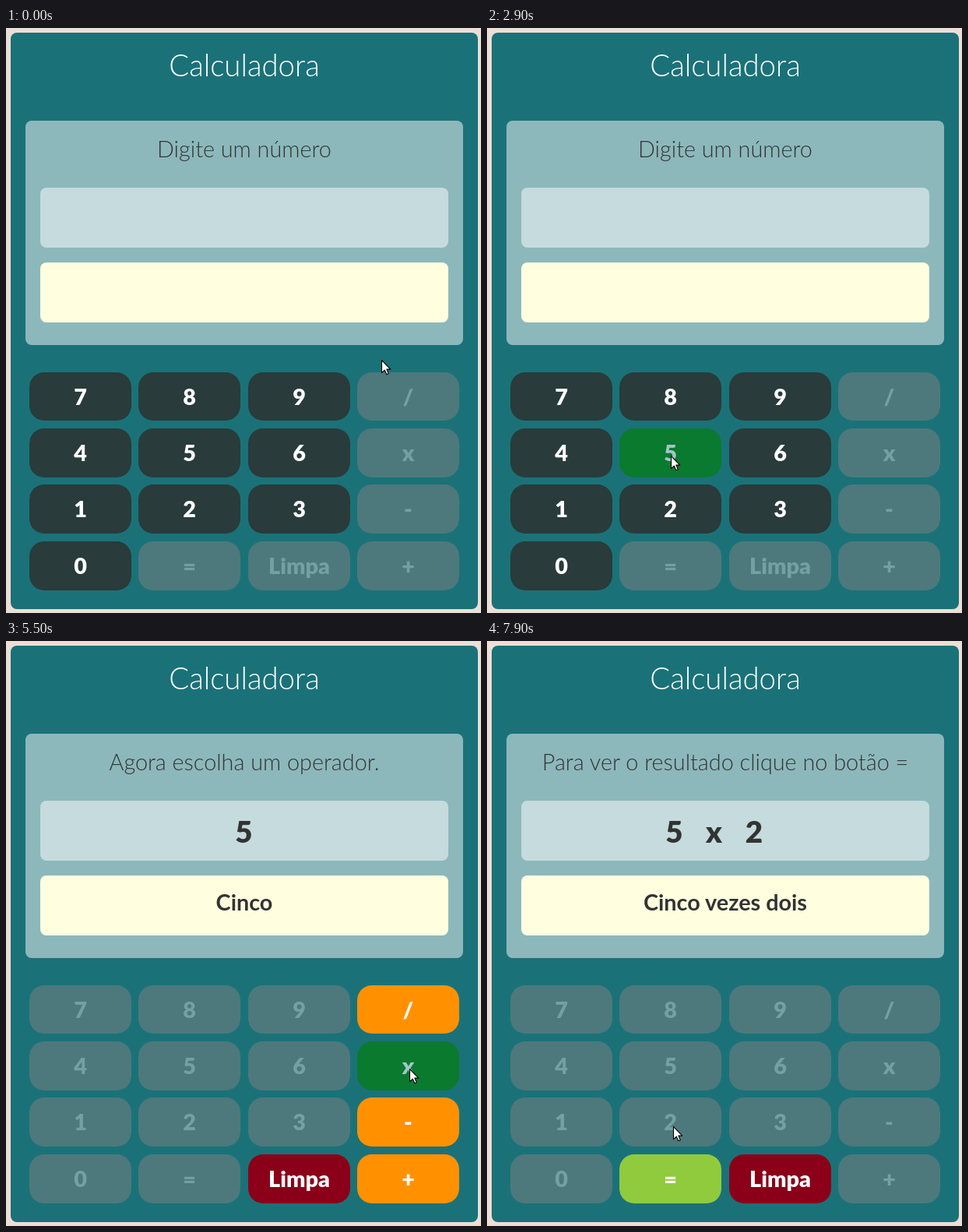
These frames come from a looping animation (610x751 px, 8000 ms). An HTML page:

```html
<!DOCTYPE html>
<html lang="pt">
<head>
<meta charset="utf-8">
<title>Calculadora</title>
<style>
  html, body { margin: 0; width: 100%; height: 100%; overflow: hidden; background: #ecdfd6; }
  svg { display: block; width: 610px; height: 751px; }
  text { font-family: Lato, sans-serif; font-size: 28.8px; text-anchor: middle; fill: #333; }
  .title { font-size: 38.4px; font-weight: 300; fill: #fff; }
  .message { font-weight: 300; }
  .term { font-size: 38.4px; font-weight: 900; }
  .words { font-weight: 700; }
  .key text { font-weight: 900; fill: #fff; }
  .digit rect { fill: #293b3a; }
  .op rect { fill: #ff9100; }
  .equal rect { fill: #90cb3e; }
  .clear rect { fill: #8b0018; }
  .off rect { fill: #4d797c; }
  .off text { fill: #74a0a3; }
  .hover { opacity: .6; }
  .press rect { fill: #008000; }
</style>
</head>
<body>
<svg id="stage" viewBox="0 0 610 751">
  <rect x="6" y="6" width="600" height="740" rx="8" fill="#1a7278"/>
  <text class="title" x="306" y="62">Calculadora</text>
  <rect x="25" y="119" width="562" height="288" rx="8" fill="#8cb8bb"/>
  <text class="message" id="message" x="306" y="166"></text>
  <rect x="44" y="205" width="524" height="77" rx="8" fill="#c5dbdd"/>
  <g id="terms"></g>
  <rect x="44" y="301" width="524" height="77" rx="8" fill="#ffffe0"/>
  <text class="words" id="words" x="306" y="346"></text>
  <g id="keys"></g>
  <path id="cursor" d="M.5 .5V16.6L4.3 13.1L6.8 18.8L9.3 17.7L6.9 12.1H11.8Z"
        fill="#fff" stroke="#000" stroke-width="1.1" stroke-linejoin="round"/>
</svg>
<script>
const LOOP = 8000;
const $ = id => document.getElementById(id);

function add(parent, tag, attrs, text = '') {
  const el = document.createElementNS('http://www.w3.org/2000/svg', tag);
  for (const k in attrs) el.setAttribute(k, attrs[k]);
  el.textContent = text;
  return parent.appendChild(el);
}

// Keypad
const colX = [30, 170, 311, 451];
const rowY = [442, 514, 586, 659];
const rows = ['7 8 9 /', '4 5 6 x', '1 2 3 -', '0 = Limpa +'];
const kindOf = s => s === '=' ? 'equal' : s === 'Limpa' ? 'clear' : /\d/.test(s) ? 'digit' : 'op';
const keys = [];
rows.forEach((row, r) => row.split(' ').forEach((label, c) => {
  const el = add($('keys'), 'g', {});
  add(el, 'rect', { x: colX[c], y: rowY[r], width: 131, height: r ? 63 : 62, rx: 19.2 });
  add(el, 'text', { x: colX[c] + 65.5, y: rowY[r] + 42 }, label);
  keys.push({ el, label, kind: kindOf(label) });
}));

// Calculator states
const states = [
  { t: 0, msg: 'Digite um número', terms: [], words: '', on: ['digit'] },
  { t: 2950, msg: 'Agora escolha um operador.', terms: [['5', 305.5]],
    words: 'Cinco', on: ['op', 'clear'] },
  { t: 5550, msg: 'Ótimo! Agora escolha outro número.', terms: [['5', 265.5], ['x', 317]],
    words: 'Cinco vezes', on: ['digit', 'clear'] },
  { t: 7050, msg: 'Para ver o resultado clique no botão =',
    terms: [['5', 240.5], ['x', 291.5], ['2', 343]],
    words: 'Cinco vezes dois', on: ['equal', 'clear'] }
];

// Pointer steps: time, x, y, key under it, pressed
const steps = [
  [0, 482, 426],
  [600, 474, 436],
  [700, 432, 468, '9'],
  [800, 352, 516, '6'],
  [900, 240, 556, '5'],
  [1000, 156, 570, '4'],
  [1100, 180, 564, '5'],
  [1200, 228, 551, '5'],
  [1300, 253, 545, '5'],
  [1500, 244, 546, '5'],
  [1600, 236, 549, '5'],
  [2900, 236, 549, '5', true],
  [3000, 236, 549],
  [3800, 258, 550],
  [3900, 325, 545],
  [4000, 424, 532],
  [4100, 510, 517, 'x'],
  [4200, 548, 508],
  [4300, 546, 493, '/'],
  [4400, 541, 486, '/'],
  [4800, 538, 494, '/'],
  [4900, 530, 518, 'x'],
  [5000, 522, 541, 'x'],
  [5100, 518, 549, 'x'],
  [5500, 518, 549, 'x', true],
  [5600, 518, 549],
  [5700, 500, 556],
  [5800, 446, 579],
  [5900, 372, 602, '3'],
  [6000, 308, 614],
  [6100, 292, 614],
  [6200, 267, 609, '2'],
  [6300, 252, 604, '2'],
  [6400, 248, 601, '2'],
  [6500, 243, 604, '2'],
  [6600, 246, 607, '2'],
  [7000, 246, 607, '2', true],
  [7100, 246, 607],
  [7900, 239, 623]
];

const lastBefore = (list, t, time) => list.filter(e => time(e) <= t).pop();
let shown = null;

function draw(ms) {
  const step = lastBefore(steps, ms % LOOP, s => s[0]);
  if (step === shown) return;
  shown = step;
  const [t, x, y, over, pressed] = step;
  const state = lastBefore(states, t, s => s.t);

  $('message').textContent = state.msg;
  $('words').textContent = state.words;
  $('terms').replaceChildren();
  for (const [text, cx] of state.terms)
    add($('terms'), 'text', { class: 'term', x: cx, y: 259 }, text);

  for (const { el, label, kind } of keys) {
    const on = state.on.includes(kind);
    let cls = 'key ' + (on ? kind : 'off');
    if (on && label === over) cls += pressed ? ' hover press' : ' hover';
    el.setAttribute('class', cls);
  }
  $('cursor').setAttribute('transform', `translate(${x} ${y})`);
}

const start = performance.now();
function tick() {
  draw(performance.now() - start);
  requestAnimationFrame(tick);
}
tick();
</script>
</body>
</html>
```
